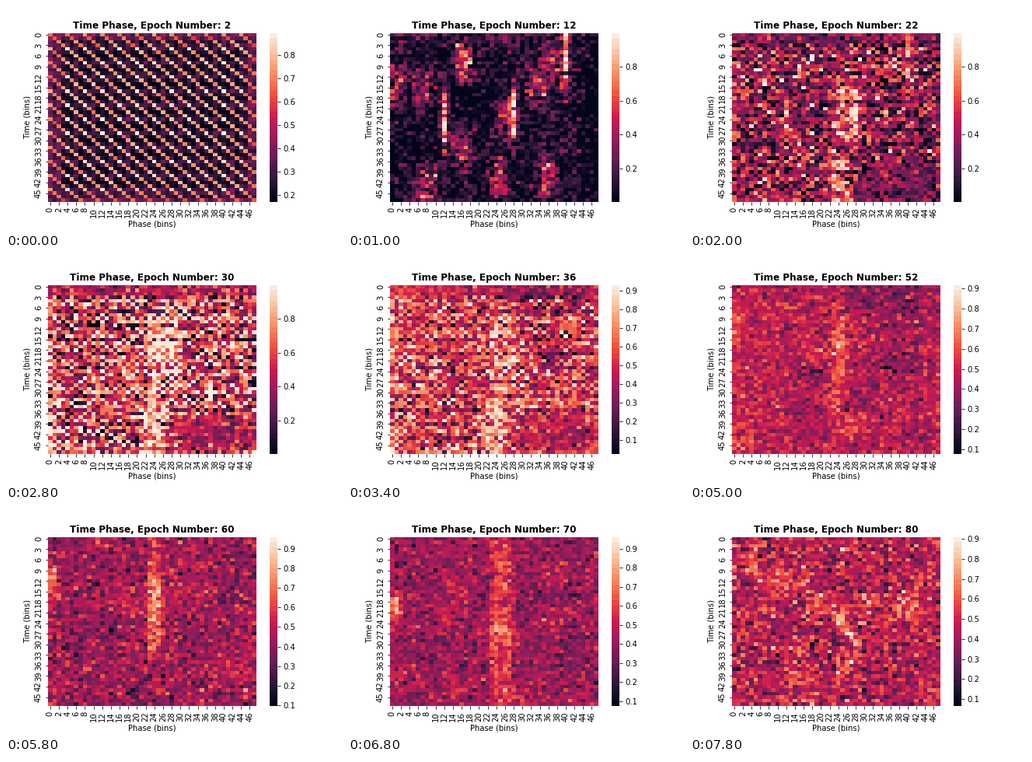
Animation, 432 px wide and 288 px high, one loop 8000 ms. Source, as a matplotlib script:

```python
import numpy as np
import matplotlib.pyplot as plt
from matplotlib.animation import FuncAnimation
from matplotlib.colors import LinearSegmentedColormap

N = 48
FRAMES = 40
LEVELS = 32
ROW, COL = np.mgrid[0:N, 0:N]
CHECKER = (-1.0) ** (ROW + COL)

ROCKET = ["#03051a", "#30173a", "#611f53", "#961c5b", "#cb1b4f",
          "#ec4c3e", "#f4875e", "#f6bc99", "#faebdd"]
cmap = LinearSegmentedColormap.from_list("rocket", ROCKET, N=LEVELS)


def patch(c, r, w, h):
    """Soft-edged block of height 1 centred on column c and row r."""
    return np.exp(-((COL - c) / w) ** 4 - ((ROW - r) / h) ** 4)


def spots(seed, count, size):
    """Seeded scatter of soft blocks."""
    rng = np.random.default_rng(seed)
    return sum(patch(*rng.uniform(0, N, 2), size, size)
               for _ in range(count))


# Each state gives a mean map and a spread.
def lattice():
    d = np.pi / 2 * (COL - ROW)
    wave = 0.27 * np.cos(d) + 0.13 * np.cos(2 * d)
    wave += 0.06 * np.cos(np.pi / 2 * ROW) + 0.04 * np.cos(np.pi * COL)
    rim = np.minimum(np.minimum(ROW, N - 1 - ROW),
                     np.minimum(COL, N - 1 - COL))
    fade = np.clip((rim + 1) / 5, 0, 1)
    return 0.45 - 0.08 * fade + wave * (0.45 + 0.55 * fade), 0.035


def streaks():
    glow = sum(patch(c, r, 0.9, 9) for c, r in ((40, 7), (28, 23), (12, 25)))
    glow = 0.75 * glow + 0.5 * patch(16.5, 8, 2, 6)
    for c, r in ((1, 14), (7, 15), (8, 42), (16, 33), (24.5, 42),
                 (26, 24), (33, 14), (36, 40), (37.5, 9)):
        glow = glow + 0.3 * patch(c, r, 2.3, 6)
    gloom = patch(19, 19, 6, 6) + patch(5, 31, 6, 5) + patch(46, 26, 3, 30)
    mu = 0.07 + glow - 0.1 * gloom + 0.14 * np.exp(-ROW / 1.5)
    return mu, 0.13 + 0.3 * np.clip(glow, 0, 0.6)


def blaze():
    mu = 0.62 - 0.24 * (ROW % 4 == 3) + 0.14 * CHECKER
    mu = mu + 0.35 * patch(26, 20, 4, 12) + 0.4 * patch(24, 41, 3, 8)
    mu = mu + 0.15 * (COL < 2) + 0.3 * (ROW == N - 1)
    calm = np.maximum(patch(38, 42, 11, 6), 0.9 * (ROW < 3))
    return mu + (0.42 - mu) * calm, 0.27 - 0.14 * calm


def embers():
    left = np.clip(1 - COL / 16, 0, 1)
    mu = 0.5 + (0.08 + 0.05 * CHECKER) * left
    mu = mu - 0.27 * patch(35, 3, 10, 5) - 0.07 * patch(36, 15, 10, 12)
    for c, r in ((38, 21), (17, 25), (18, 36), (42, 41)):
        mu = mu - 0.16 * patch(c, r, 4, 3)
    for c, r in ((25.5, 11), (23, 34), (27, 39)):
        mu = mu + 0.2 * patch(c, r, 2.4, 2.5)
    return mu + 0.08 * (COL == N - 1), 0.08 - 0.03 * left


def beam():
    mu = 0.43 + 0.28 * patch(24, 18, 1.5, 16) + 0.23 * patch(0.7, 12, 1.3, 5)
    return mu + 0.06 * spots(6, 8, 4), 0.1


def wide_beam():
    mu = 0.41 + 0.21 * patch(25, 24, 2.4, 30) + 0.3 * patch(0.5, 19, 1.4, 4)
    return mu + 0.06 * spots(7, 8, 4), 0.09


def bend():
    curve = 26 - 2 * np.cos((ROW - 21) * np.pi / 10)
    arc = np.exp(-((COL - curve) / 1.5) ** 4 - ((ROW - 30) / 11) ** 6)
    mu = 0.45 + 0.2 * arc + 0.25 * patch(4, 8, 1, 3)
    return mu + 0.07 * spots(8, 8, 4), 0.125


# step, state, colour range
KEYS = [(0, lattice, .170, .894), (5, streaks, 0, 1), (14, blaze, 0, 1),
        (20, embers, .048, .861), (29, beam, .097, .960),
        (34, wide_beam, .075, .963), (39, bend, .065, .911)]
STATES = [(step, *state(), lo, hi) for step, state, lo, hi in KEYS]


def values(i):
    k = max(j for j in range(len(STATES) - 1) if STATES[j][0] <= i)
    (start, *a), (stop, *b) = STATES[k], STATES[k + 1]
    t = (i - start) / (stop - start)
    t = t * t * (3 - 2 * t)
    mu, sd, lo, hi = ((1 - t) * p + t * q for p, q in zip(a, b))
    noise = np.random.default_rng(100 + i).normal(size=(N, N))
    return np.clip(mu + sd * noise, lo, hi), lo, hi


fig = plt.figure(figsize=(6, 4), dpi=72, facecolor="white")
ax = fig.add_axes([0.125, 0.125, 0.62, 0.755])
bar = fig.add_axes([0.78375, 0.125, 0.02517, 0.755])

mesh = ax.pcolormesh(np.zeros((N, N)), cmap=cmap)
ax.set_ylim(N, 0)
ax.set_xticks(np.arange(0, N, 2) + 0.5, range(0, N, 2), rotation=90)
ax.set_yticks(np.arange(0, N, 3) + 0.5, range(0, N, 3), rotation=90,
              va="center")
ax.set_xlabel("Phase (bins)")
ax.set_ylabel("Time (bins)")
title = ax.set_title("", fontsize=12, fontweight="bold")

bar.pcolormesh([0, 1], np.linspace(0, 1, LEVELS + 1),
               np.arange(LEVELS)[:, None], cmap=cmap)
bar.set_xticks([])
bar.yaxis.tick_right()
for a in (ax, bar):
    a.spines[:].set_visible(False)


def draw(i):
    data, lo, hi = values(i)
    mesh.set_array(data)
    mesh.set_clim(lo, hi)
    title.set_text(f"Time Phase, Epoch Number: {2 + 2 * i}")
    step = 0.2 if hi - lo > 0.92 else 0.1
    ticks = [v for v in np.arange(1, 10) * step if lo < v < hi - 0.001]
    bar.set_yticks([(v - lo) / (hi - lo) for v in ticks],
                   [f"{v:.1f}" for v in ticks])
    bar.set_ylim(0, 1)
    return mesh, title


anim = FuncAnimation(fig, draw, frames=FRAMES, interval=200, repeat=True,
                     repeat_delay=0, init_func=lambda: draw(0), blit=False)
plt.show()
```
